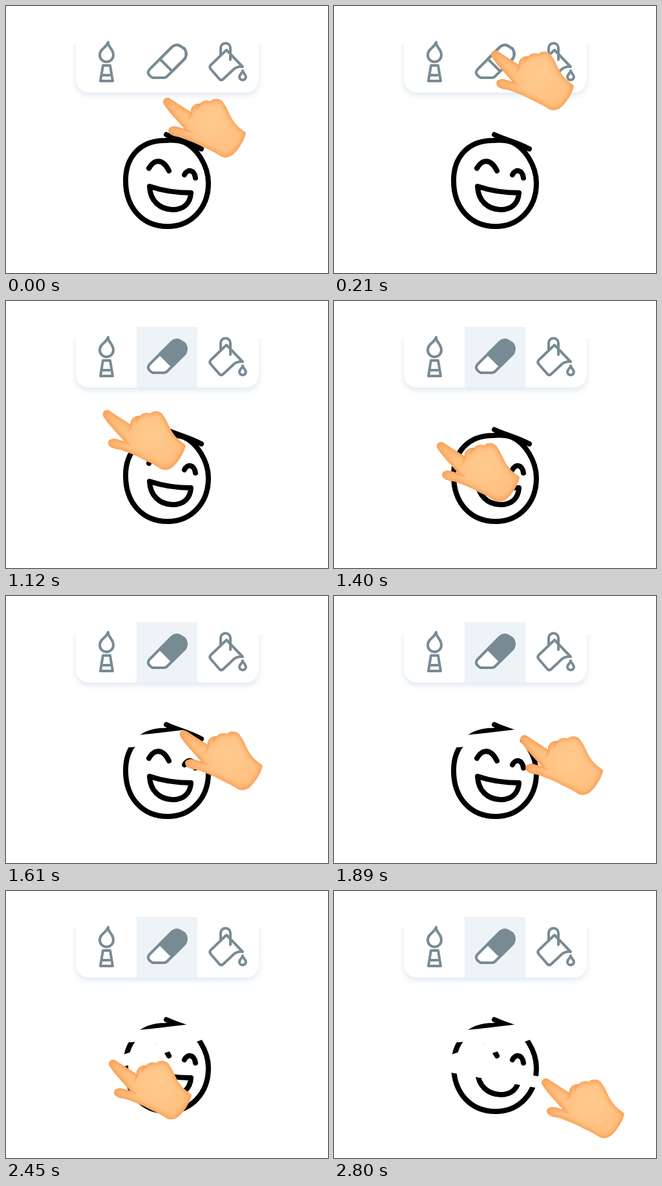
An HTML page with a canvas that plays this animation: 498 by 413 pixels, repeating every 3.08 s.

```html
<!DOCTYPE html>
<html lang="en">
<head>
<meta charset="utf-8">
<title>Eraser</title>
<style>
html, body { margin: 0; width: 100%; height: 100%; overflow: hidden; background: #fff; }
canvas { display: block; }
</style>
</head>
<body>
<canvas id="stage" width="498" height="413"></canvas>
<script>
const ctx = document.getElementById('stage').getContext('2d');
const LOOP = 3080, STEP = 70, LAST = 2800, SELECT_AT = 420, ERASE_AT = 1260;
const GREY = '#788a94';

// The hand glides along quadratic curves; each one starts where the last ended.
const HOME = [243, 141];
const moves = [
  { end: 280, via: [243, 63], to: [243, 63] },
  { end: 840, via: [248, 87], to: [228, 91] },
  { end: 1330, via: [129, 164], to: [137, 217] },
  { end: 1680, via: [183, 220], to: [320, 200] },
  { end: 2240, via: [301, 213], to: [157, 259] },
  { end: LAST, via: [112, 252], to: [321, 289] }
];

const face = new Path2D(`M276 211 C294 219 313 246 313 274 C313 312 287 341 250 341
  C211 341 185 312 185 270 C185 234 207 208 246 208 C258 207 268 208 276 211
  M248 199 C262 206 284 211 302 221
  M221 251 C228 238 242 234 252 255 M276 261 C280 252 291 252 293 266
  M222 279 C240 285 265 289 286 289 C285 306 274 315 257 315 C238 314 223 302 222 279Z`);
const eraser = new Path2D(`M222 98 L257 63 Q262 59 268 61 L276 66 Q281 73 277 81
  L249 109 Q247 111 244 111 L227 111 Q216 105 222 98Z`);
const eraserTop = new Path2D('M238 82 L257 63 Q262 59 268 61 L276 66 Q281 73 277 81 L257 101Z');
const brush = new Path2D(`M158 56 C157 63 166 66 166 76 A10.5 10.5 0 0 1 145 76
  C145 66 155 65 158 56Z M150 92 H161 L165 116 H146Z M150 107 H160`);
const bucket = new Path2D(`M341 68 L316 92 Q314 95 317 98 L330 113 Q333 116 336 113
  L352 98 Q358 93 366 94Z M332 76 V65 A7.5 7.5 0 0 1 347 65 V83
  M366 100 C366 103 371 106 371 109.5 A5 5 0 0 1 361 109.5 C361 106 366 103 366 100Z`);
const hand = new Path2D(`M1 11 C-3 4 5 -3 12 3 L43 23 C41 17 49 8 57 10
  C61 5 68 4 73 6 C79 0 91 2 94 10 C99 15 103 29 109 37 C114 45 122 50 128 55
  C127 66 114 86 105 91 C99 94 95 94 90 92 C80 85 72 82 62 77 C52 71 38 66 27 62
  C18 61 9 59 8 52 C8 45 17 44 23 46 L33 49 C22 36 9 24 1 11Z`);
const creases = new Path2D('M43 22 Q44 28 40 33 M32 48 Q36 52 42 54 M57 10 Q53 14 52 19');

function handAt(t) {
  let start = 0, from = HOME;
  for (const { end, via, to } of moves) {
    if (t <= end) {
      const u = (t - start) / (end - start), v = 1 - u;
      return from.map((p, i) => p * v * v + 2 * via[i] * u * v + to[i] * u * u);
    }
    start = end;
    from = to;
  }
  return from;
}

function line(path, color, width) {
  ctx.strokeStyle = color;
  ctx.lineWidth = width;
  ctx.stroke(path);
}

function drawTrail(t) {
  const trail = new Path2D();
  for (let s = ERASE_AT; s <= t; s += 10) {
    const [x, y] = handAt(s);
    trail.lineTo(x + 7, y + 9);
  }
  ctx.lineCap = 'butt';
  line(trail, '#fff', 18);
  ctx.lineCap = 'round';
}

function drawToolbar(selected) {
  ctx.save();
  ctx.beginPath();
  ctx.rect(90, 58, 320, 100);
  ctx.clip();
  ctx.shadowColor = 'rgba(110,150,185,.22)';
  ctx.shadowBlur = 10;
  ctx.shadowOffsetY = 4;
  ctx.fillStyle = '#fff';
  ctx.beginPath();
  ctx.roundRect(108, 20, 283, 114, 20);
  ctx.fill();
  ctx.restore();

  if (selected) {
    ctx.fillStyle = '#eef3f7';
    ctx.fillRect(202, 40, 94, 94);
    ctx.fillStyle = '#fff';
    ctx.fill(eraser);
    ctx.fillStyle = GREY;
    ctx.fill(eraserTop);
  }
  for (const icon of [brush, eraser, eraserTop, bucket]) line(icon, GREY, 4);
}

function drawHand(x, y) {
  ctx.save();
  ctx.translate(x, y);
  ctx.clip(hand);
  const skin = ctx.createRadialGradient(76, 38, 5, 76, 38, 75);
  skin.addColorStop(0, '#ffca8e');
  skin.addColorStop(1, '#ffba76');
  ctx.fillStyle = skin;
  ctx.fill(hand);
  ctx.filter = 'blur(3px)';
  line(hand, '#f6954c', 5);
  ctx.filter = 'blur(1px)';
  line(creases, 'rgba(238,137,62,.6)', 2);
  ctx.restore();
}

function draw(now) {
  const t = Math.min(LAST, Math.floor(now % LOOP / STEP) * STEP);
  ctx.fillStyle = '#fff';
  ctx.fillRect(0, 0, 498, 413);
  ctx.lineCap = ctx.lineJoin = 'round';
  line(face, '#000', 8);
  drawTrail(t);
  drawToolbar(t >= SELECT_AT);
  drawHand(...handAt(t));
}

let start;
function tick(now) {
  start ??= now;
  draw(now - start);
  requestAnimationFrame(tick);
}
draw(0);
requestAnimationFrame(tick);
</script>
</body>
</html>
```
